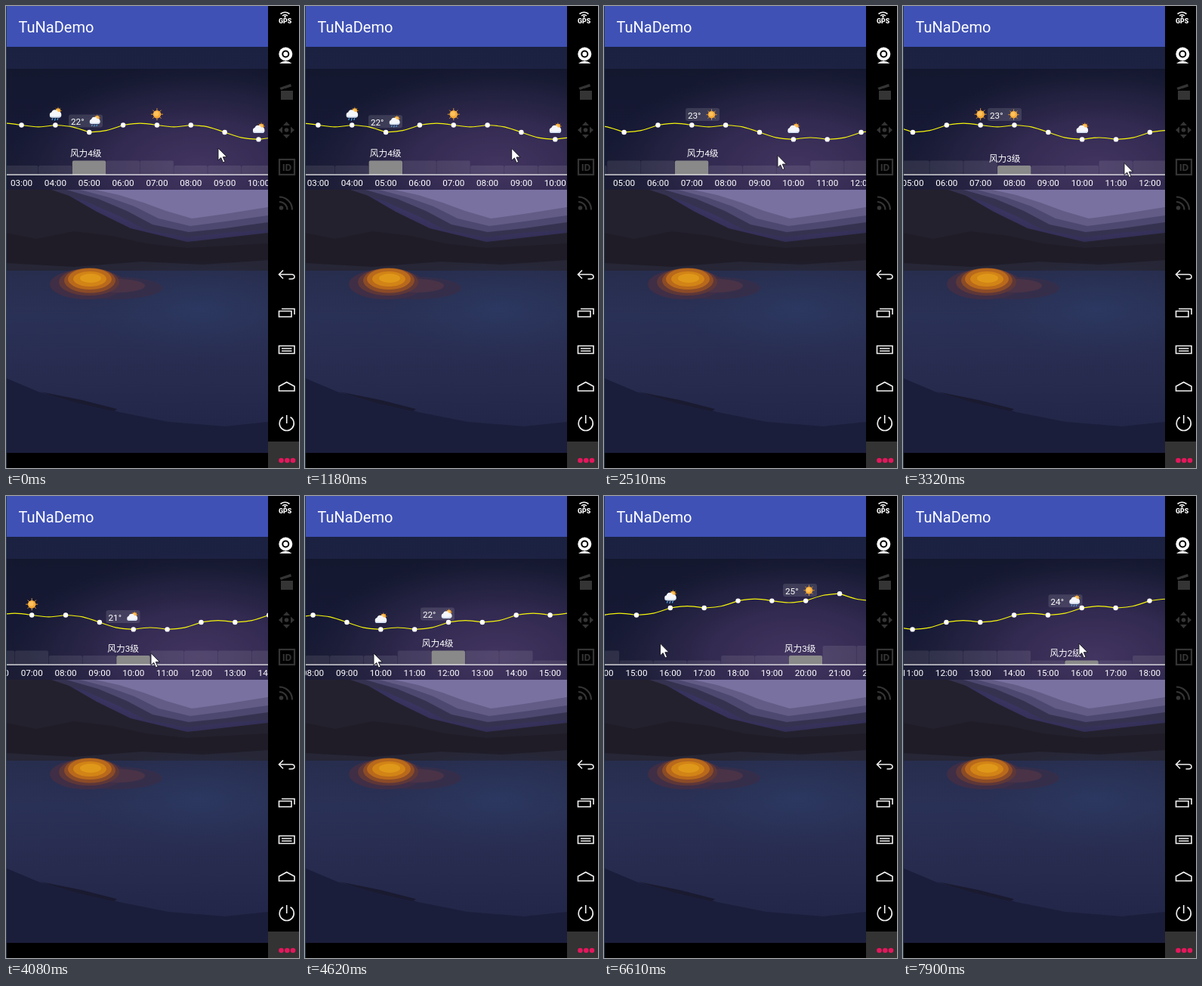
Animation of 388x611 px, one loop 8 s. Source, as an HTML page:

```html
<!DOCTYPE html>
<html lang="zh">
<head>
<meta charset="utf-8">
<title>Hourly weather</title>
<style>
  html, body { margin: 0; width: 100%; height: 100%; overflow: hidden; background: #000; }
  svg { display: block; width: 388px; height: 611px; }
  text { fill: #fff; font: 11.7px Roboto, "Noto Sans CJK SC", "Noto Sans CJK", sans-serif; }
  .title { font-size: 20px; }
  .mid { text-anchor: middle; }
  .line { fill: none; stroke: #f2f2f2; stroke-width: 1.6; }
  .dim { fill: #343434; }
  .dimline { fill: none; stroke: #343434; stroke-width: 2.2; }
</style>
</head>
<body>
<svg viewBox="0 0 388 611">
  <defs>
    <linearGradient id="sky" x2="0" y2="1">
      <stop offset="0" stop-color="#1b2140"/>
      <stop offset=".4" stop-color="#20244b"/>
      <stop offset=".72" stop-color="#2a2a4b"/>
      <stop offset="1" stop-color="#211f2e"/>
    </linearGradient>
    <radialGradient id="dusk">
      <stop offset="0" stop-color="#5f4c8a"/>
      <stop offset=".45" stop-color="#4d3f78" stop-opacity=".9"/>
      <stop offset=".75" stop-color="#393563" stop-opacity=".6"/>
      <stop offset="1" stop-color="#2a2c52" stop-opacity="0"/>
    </radialGradient>
    <linearGradient id="sea" x2="0" y2="1">
      <stop offset="0" stop-color="#272d4d"/>
      <stop offset=".25" stop-color="#2a3156"/>
      <stop offset=".6" stop-color="#272b4e"/>
      <stop offset="1" stop-color="#1f2344"/>
    </linearGradient>
    <radialGradient id="blue">
      <stop offset="0" stop-color="#2d3d69" stop-opacity=".6"/>
      <stop offset="1" stop-color="#2c3860" stop-opacity="0"/>
    </radialGradient>
    <clipPath id="phone"><rect x="1" y="54" width="346" height="537"/></clipPath>

    <g id="sun">
      <path d="M0-8V8M-8 0H8M-5.6-5.6L5.6 5.6M5.6-5.6L-5.6 5.6" stroke="#e0983a" stroke-width="1"/>
      <circle r="5.3" fill="#f7a935"/><circle cx="-.8" cy="-.8" r="3.2" fill="#ffc25c"/>
    </g>
    <g id="cloud">
      <use href="#sun" transform="translate(3.6 -3) scale(.62)"/>
      <path d="M-4.600 6A3.600 3.600 0 0 1-5-1A4.600 4.600 0 0 1 3.600-1.700A3.900 3.900 0 0 1 4.800 6Z" fill="#f4f6fb"/>
      <path d="M-7.800 3.800Q0 5.600 7.800 3.400Q7 6 4.800 6H-4.600Q-7 6-7.800 3.800Z" fill="#cfdcf0"/>
    </g>
    <g id="rain">
      <use href="#cloud" y="-1.6"/>
      <path d="M-3.500 5.200l-1 2.600M0 5.200l-1 3.200M3.500 5.200l-1 2.600" stroke="#4fa6e8" stroke-width="1.2"/>
    </g>
  </defs>

  <rect width="388" height="611"/>

  <g clip-path="url(#phone)">
    <rect y="54" width="348" height="298" fill="url(#sky)"/>
    <ellipse cx="255" cy="212" rx="255" ry="135" fill="url(#dusk)"/>
    <path d="M0 243H70L120 272L165 294L240 312L347 300V352H0Z" fill="#24212e"/>
    <path d="M60 243L105 258L150 278L185 296L240 306L290 300L347 296V243Z" fill="#353250"/>
    <path d="M80 243L122 255L160 271L194 289L242 299L290 294L347 286V243Z" fill="#4c486f"/>
    <path d="M98 243L136 253L170 265L202 281L244 291L290 285L347 277V243Z" fill="#625c86"/>
    <path d="M118 243L150 250L182 260L212 271L246 281L290 275L347 266V243Z" fill="#7971a0"/>
    <path d="M0 300L40 308L90 298L140 304L185 314L240 320L347 314V350H0Z" fill="#1f1c27"/>
    <path d="M0 340L90 345L180 338L260 342L347 336V354H0Z" fill="#262636"/>

    <rect y="350" width="348" height="242" fill="url(#sea)"/>
    <ellipse cx="255" cy="400" rx="150" ry="65" fill="url(#blue)"/>
    <path d="M0 492L45 511L95 522L150 537L215 550L290 556L347 550V592H0Z" fill="#1b1e3b"/>
    <path d="M45 510L100 521L147 533L143 536L95 525Z" fill="#1a1a30"/>

    <ellipse cx="145" cy="373" rx="62" ry="15" fill="#352e4b"/>
    <ellipse cx="108" cy="368" rx="50" ry="20" fill="#3f2e46"/>
    <ellipse cx="148" cy="370" rx="36" ry="9" fill="#4a3347"/>
    <ellipse cx="110" cy="365" rx="40" ry="18" fill="#5e3738"/>
    <ellipse cx="111" cy="363" rx="34" ry="16.500" fill="#8b4b27"/>
    <ellipse cx="111" cy="361" rx="29" ry="14" fill="#b9691b"/>
    <ellipse cx="111" cy="361" rx="22" ry="10" fill="#d28416"/>
    <ellipse cx="112" cy="360" rx="14" ry="6" fill="#e0981a"/>

    <rect y="83" width="348" height="160" fill="#000" opacity=".3"/>
    <g id="track"></g>
    <path d="M0 223.200H348" stroke="#f4f4f4" stroke-width="1.2"/>
    <g id="tip">
      <rect y="-22.5" width="45" height="17" rx="3" fill="#fff" opacity=".12"/>
      <text id="temp" x="3" y="-8.800"></text>
      <use id="tipIcon" transform="translate(34.5 -13.800) scale(.9)"/>
    </g>
    <text id="wind" class="mid"></text>
  </g>

  <rect width="1" height="611" fill="#24394c"/>
  <rect x="1" width="346" height="54" fill="#3f51b5"/>
  <text class="title" x="16.5" y="34.500">TuNaDemo</text>

  <rect x="347" y="576" width="41" height="35" fill="#333"/>
  <g fill="#e5175c"><circle cx="364.5" cy="601" r="3.3"/><circle cx="372.3" cy="601" r="3.3"/><circle cx="380" cy="601" r="3.3"/></g>

  <path class="line" d="M363.5 10.500Q369.500 6 375.500 10.500M366 13Q369.500 10.200 373 13"/>
  <circle cx="369.5" cy="14.2" r="1.2" fill="#fff"/>
  <text class="mid" x="369.7" y="23.3" style="font-size:8.8px;font-weight:900">GPS</text>

  <circle cx="370.3" cy="63.5" r="9" fill="#fff"/>
  <circle cx="370.3" cy="63.5" r="5"/><circle cx="370.3" cy="63.5" r="3" fill="#fff"/>
  <path d="M362 76Q370 69.500 378.500 76Z" fill="#fff"/>

  <path class="dim" d="M364 112H380V124H364ZM362.500 108L377 103L378 106.500L364 111Z"/>
  <path d="M367 112l2-3M372 112l2-3M377 112l2-3" stroke="#000"/>
  <path class="dim" d="M371.500 153l4.500 5h-9ZM371.500 175l4.500-5h-9ZM361 164l5-4.500v9ZM382 164l-5-4.500v9Z"/>
  <circle class="dim" cx="371.5" cy="164" r="2.8"/>
  <rect class="dimline" x="362" y="203" width="20" height="20"/>
  <text class="mid" x="372" y="218" style="font-size:13.5px;font-weight:700;fill:#343434">ID</text>
  <circle class="dim" cx="364.5" cy="267" r="2.8"/>
  <path class="dimline" d="M362 259A10.500 10.500 0 0 1 372.500 269.500M362 252.500A17 17 0 0 1 379 269.500"/>

  <path class="line" d="M367 349.500L361.500 355L367 360.500M361.500 355H378Q382 355 382 358T378 361H374.500"/>
  <path class="line" d="M361.500 403.500H378V411H361.500ZM365 400.500H382V408"/>
  <path class="line" d="M361.500 449.500H382V459.500H361.500ZM365 453H378.500M365 456.200H378.500"/>
  <path class="line" d="M361.500 509V503L371.700 497.500L382 503V509Z"/>
  <path class="line" d="M367 543.800A9.500 9.500 0 1 0 376.500 543.800M371.700 541V552"/>

  <path id="cursor" d="M0 0V16L3.700 12.600L6.500 19L9 18L6.300 11.700H11.500Z" fill="#fff" stroke="#15151c" stroke-width=".9"/>
</svg>
<script>
const $ = id => document.getElementById(id);
const LOOP = 8000, W = 44.85, BASE = 223, HOURS = 24;
const FIRST = 1040, STEP = 131.9; // the screen refreshes in steady steps after a pause

// each value holds from its hour until the next one
const temps = { 0: 23, 5: 22, 6: 23, 9: 22, 10: 21, 12: 22, 14: 23, 16: 24, 18: 25, 21: 26, 22: 25 };
const winds = { 0: 3, 5: 4, 8: 3, 11: 4, 15: 2, 18: 3, 21: 5 };
const skies = { 0: 'cloud', 4: 'rain', 7: 'sun', 10: 'cloud', 16: 'rain', 20: 'sun' };
const at = (runs, h) => { while (!(h in runs)) h--; return runs[h]; };

// drags: refresh step, scroll, cursor x, cursor y
const drags = [
  [-1, -114, 281, 188], [0, -114, 277, 188], [6, -133.1, 257, 190], [8, -184, 225, 196],
  [14, -211.3, 235, 199], [17, -211.3, 293, 207.5], [19, -211.3, 293, 207.5],
  [27, -348.2, 91, 208], [30, -384, 56, 205], [32, -384, 68, 205], [33, -387, 277, 190],
  [37, -459.4, 205, 187], [42, -629.8, 74.5, 195], [44, -633, 76, 195], [52, -480.8, 233, 195]
];

const tempY = h => 157.5 - (at(temps, h) - 23) * 9.45;
const windTop = h => 230.5 - at(winds, h) * 6.5;

function add(name, attrs, text) {
  const el = document.createElementNS('http://www.w3.org/2000/svg', name);
  for (const k in attrs) el.setAttribute(k, attrs[k]);
  if (text) el.textContent = text;
  return $('track').appendChild(el);
}

// segments bulge up and down in turn
let curve = `M0 ${tempY(0)}`;
for (let h = 1; h < HOURS; h++) {
  const x = (h - .5) * W, y = (tempY(h - 1) + tempY(h)) / 2 + (h % 2 ? -3.2 : 3.2);
  curve += `C${x} ${y} ${x} ${y} ${h * W} ${tempY(h)}`;
}
add('path', { d: curve, fill: 'none', stroke: '#f5f50a', 'stroke-width': 1.2 });

const bars = [], icons = {};
for (let h = 0; h < HOURS; h++) {
  const x = h * W, top = windTop(h);
  bars.push(add('path', { d: `M${x - W / 2} ${BASE}V${top + 2}q0-2 2-2H${x + W / 2 - 2.5}q2 0 2 2V${BASE}Z` }));
  add('circle', { cx: x, cy: tempY(h), r: 3.2, fill: '#fff' });
  add('text', { x, y: 238, class: 'mid' }, String(h).padStart(2, '0') + ':00');
  if (h in skies) icons[h] = add('use', { href: '#' + skies[h], x, y: tempY(h) - 14.3 });
}

function pose(step) {
  const n = drags.findIndex(d => d[0] >= step);
  if (n < 1) return drags[0];
  const a = drags[n - 1], b = drags[n], f = (step - a[0]) / (b[0] - a[0]);
  return a.map((v, i) => v + (b[i] - v) * f);
}

function draw(time) {
  const [, scroll, cx, cy] = pose(Math.max(-1, Math.floor((time - FIRST) / STEP)));
  const left = 83 + .2986 * (-114 - scroll);
  const pos = (left + 22.4 - scroll) / W, sel = Math.round(pos), lo = Math.floor(pos);
  const y = tempY(lo) + (tempY(lo + 1) - tempY(lo)) * (pos - lo);

  $('track').setAttribute('transform', `translate(${scroll})`);
  bars.forEach((bar, h) => {
    bar.setAttribute('fill', h === sel ? '#8a8989' : '#fff');
    bar.setAttribute('opacity', h === sel ? 1 : .09);
  });
  for (const h in icons) icons[h].setAttribute('visibility', +h === sel ? 'hidden' : 'visible');

  $('tip').setAttribute('transform', `translate(${left} ${y})`);
  $('temp').textContent = at(temps, sel) + '°';
  $('tipIcon').setAttribute('href', '#' + at(skies, sel));
  $('wind').textContent = `风力${at(winds, sel)}级`;
  $('wind').setAttribute('x', left + 22.7);
  $('wind').setAttribute('y', windTop(sel) - 5.2);
  $('cursor').setAttribute('transform', `translate(${cx} ${cy})`);
}

const start = performance.now();
function loop() {
  draw((performance.now() - start) % LOOP);
  requestAnimationFrame(loop);
}
loop();
</script>
</body>
</html>
```
